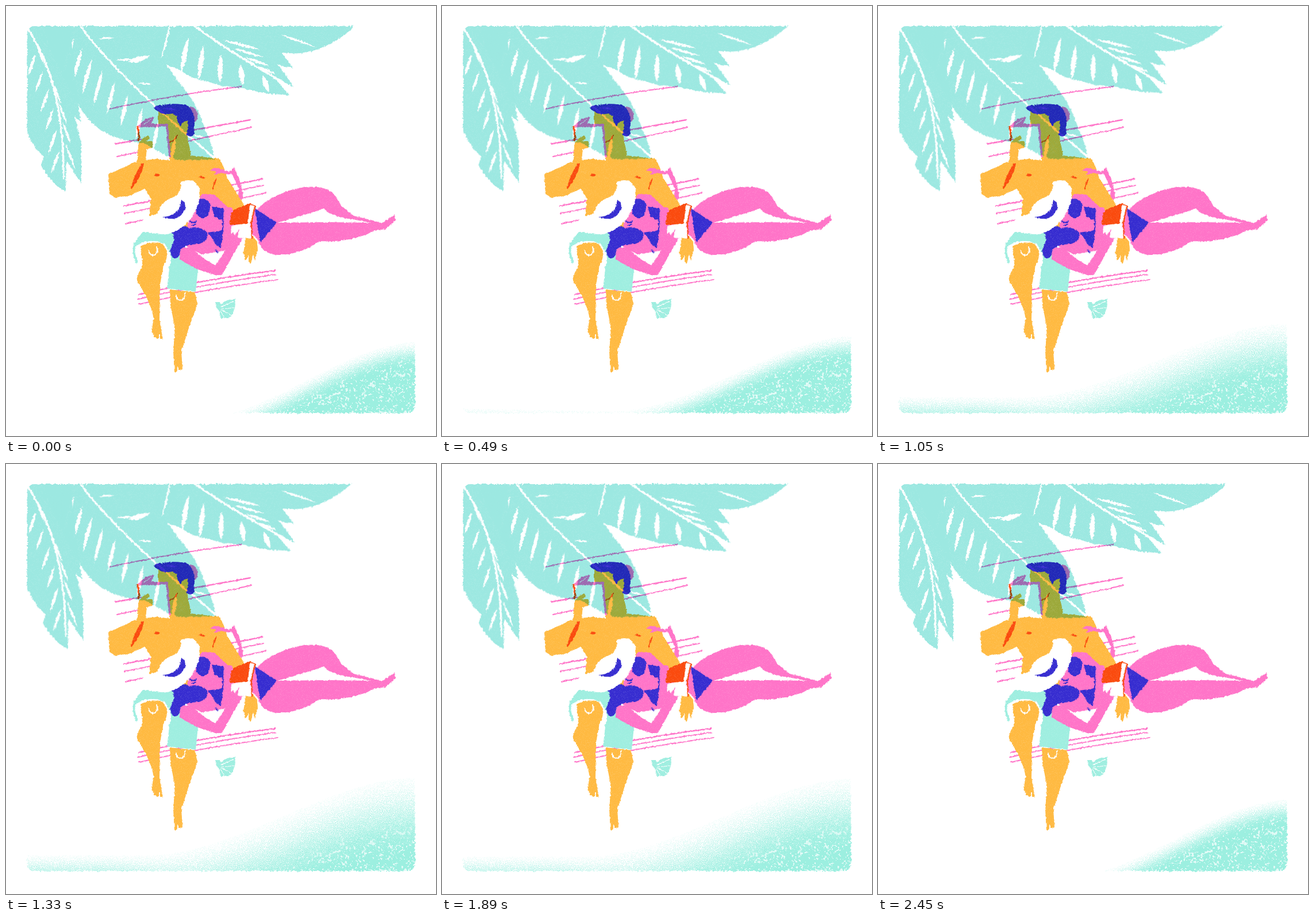
Animation of 748x748 px, one loop 2520 ms. Source, as an HTML page with a canvas:

```html
<!DOCTYPE html>
<html lang="en">
<head>
<meta charset="utf-8">
<title>Reading on the beach</title>
<style>
html, body { margin: 0; width: 100%; height: 100%; overflow: hidden; background: #fff; }
canvas { display: block; width: 748px; height: 748px; }
</style>
</head>
<body>
<canvas id="stage" width="748" height="748"></canvas>
<script>
const W = 748, LOOP = 2520, STEP = 70;
const ORANGE = '#ffba42', PINK = '#ff74c8', BLUE = '#372dd0', TEAL = '#9ce8e1',
      MINT = '#9feee0', RED = '#fa4b0f', WHITE = '#fff';
const stage = document.getElementById('stage').getContext('2d');

const clamp = v => Math.max(0, Math.min(1, v));
const ease = v => { v = clamp(v); return v * v * (3 - 2 * v); };
const mix = (a, b, k) => a + (b - a) * k;
const mixPoint = (a, b, k) => [mix(a[0], b[0], k), mix(a[1], b[1], k)];

// Seeded grain, and a slightly blurred copy for blotches and rough edges
let seed = 7;
function random() {
  seed = (seed + 0x6D2B79F5) | 0;
  let r = Math.imul(seed ^ (seed >>> 15), 1 | seed);
  r = (r + Math.imul(r ^ (r >>> 7), 61 | r)) ^ r;
  return ((r ^ (r >>> 14)) >>> 0) / 4294967296;
}
const grain = Float32Array.from({ length: W * W }, random);
const blotch = grain.map((v, i) => {
  let sum = 0;
  for (let y = -1; y < 2; y++)
    for (let x = -1; x < 2; x++) sum += grain[(i + y * W + x + W * W) % (W * W)];
  return sum / 9;
});

function layer() {
  const c = document.createElement('canvas');
  c.width = c.height = W;
  return c.getContext('2d', { willReadFrequently: true });
}

// Paints once, then frays the edges and thins the colour like chalk
function chalk(paint, fray, thin) {
  const g = layer();
  paint(g);
  const src = g.getImageData(0, 0, W, W), out = g.createImageData(W, W);
  const from = new Uint32Array(src.data.buffer), to = new Uint32Array(out.data.buffer);
  for (let i = 0; i < to.length; i++) {
    const dx = Math.round((blotch[i] - 0.5) * fray);
    const dy = Math.round((blotch[(i + 40007) % to.length] - 0.5) * fray);
    to[i] = from[i + dy * W + dx] || 0;
    if (grain[i] < 0.16) out.data[i * 4 + 3] *= 1 - thin;
  }
  g.putImageData(out, 0, 0);
  return g;
}

const fill = (g, color, d) => { g.fillStyle = color; g.fill(new Path2D(d)); };
function line(g, color, width, d) {
  g.strokeStyle = color;
  g.lineWidth = width;
  g.lineCap = 'round';
  g.stroke(new Path2D(d));
}
// Lens-shaped cut, pointed at both ends
function slit(g, [x1, y1], [x2, y2], width) {
  const k = width / Math.hypot(x2 - x1, y2 - y1);
  const nx = (y1 - y2) * k, ny = (x2 - x1) * k, mx = (x1 + x2) / 2, my = (y1 + y2) / 2;
  fill(g, WHITE, `M${x1} ${y1}Q${mx + nx} ${my + ny} ${x2} ${y2}Q${mx - nx} ${my - ny} ${x1} ${y1}Z`);
}

// Slits along the rib, their direction turning from first to last
function fan(g, [a, b, c], { count, span, first, last, width }) {
  for (let i = 0; i < count; i++) {
    const k = i / (count - 1), u = mix(span[0], span[1], k);
    const [x, y] = mixPoint(mixPoint(a, b, u), mixPoint(b, c, u), u);
    const [dx, dy] = mixPoint(first, last, k), reach = 0.95 + random() * 0.15;
    slit(g, [x + dx * 0.28, y + dy * 0.28], [x + dx * reach, y + dy * reach], width);
  }
}

function leaf({ shape, rib, fans, cuts = [] }) {
  return chalk(g => {
    fill(g, TEAL, shape);
    g.globalCompositeOperation = 'source-atop';
    line(g, WHITE, 3.5, `M${rib[0]}Q${rib[1]} ${rib[2]}`);
    fans.forEach(f => fan(g, rib, f));
    cuts.forEach(c => slit(g, ...c));
  }, 6, 0.1).canvas;
}

// Back to front: middle, left, right
const leaves = [
  { pivot: [125, 30], turn: 0.01, img: leaf({
    shape: 'M60 10H320L272 92L300 132Q334 170 346 215Q359 240 363 267L300 268L278 260L240 239Q190 234 160 212Q144 200 133 184Q100 126 74 70Z',
    rib: [[126, 30], [190, 120], [362, 264]],
    fans: [
      { count: 9, span: [0, 0.8], first: [-28, 92], last: [-10, 60], width: 7 },
      { count: 5, span: [0.15, 0.85], first: [42, -4], last: [36, 8], width: 3 }],
    cuts: [[[211, 98], [251, 87], 9]] }) },
  { pivot: [50, 35], turn: 0.014, img: leaf({
    shape: 'M20 10H110Q118 120 130 203L119 190L131 240V308L105 270L103 322Q80 312 61 276L66 262Q46 245 38 222L20 215Z',
    rib: [[38, 40], [102, 135], [100, 300]],
    fans: [
      { count: 6, span: [0.15, 0.8], first: [-16, 48], last: [-20, 56], width: 5 },
      { count: 6, span: [0.1, 0.75], first: [16, 42], last: [24, 64], width: 4 }] }) },
  { pivot: [300, 30], turn: 0.02, img: leaf({
    shape: 'M290 10H603V38Q576 62 546 74Q515 86 480 81Q492 98 499 108L472 102Q490 122 500 142L470 128L493 155Q440 152 414 143Q375 141 340 129Q318 124 304 112L268 97Z',
    rib: [[322, 30], [380, 75], [498, 142]],
    fans: [
      { count: 5, span: [0, 0.75], first: [-18, 88], last: [14, 40], width: 9 },
      { count: 5, span: [0.25, 0.8], first: [80, 20], last: [34, 20], width: 5 }],
    cuts: [[[286, 30], [266, 99], 7], [[478, 50], [540, 72], 4]] }) }
];

const frame = chalk(g => {
  g.beginPath();
  g.roundRect(37, 35, 674, 673, 13);
  g.fill();
}, 8, 0);

const figures = chalk(g => {
  // Bench
  line(g, PINK, 2, 'M181 179Q300 153 410 140');
  line(g, PINK, 2.6, 'M190 240L425 198M205 348L446 301M231 502Q330 478 468 460');
  line(g, PINK, 1.8, 'M193 262L427 211M205 361L448 312M230 510Q330 486 469 467');
  line(g, PINK, 2, 'M208 379L452 325M231 519Q330 495 472 476');

  // Man: torso, raised arm, neck and face
  fill(g, ORANGE, 'M265 184H304L318 200L315 224L322 260L372 266L381 285L385 300L413 345L394 358L350 345L320 396H250V357L252 335L242 317L216 330L190 333L180 327L178 293L228 270L231 238L244 226L251 232L246 242L243 268L284 264L283 238L265 210Z');
  fill(g, PINK, 'M314 175Q330 173 333 188Q334 200 328 202Z');
  fill(g, BLUE, 'M258 179Q258 172 268 173Q298 167 317 174Q330 186 328 204L327 224Q321 230 314 224Q318 210 316 200Q307 199 304 210L297 199Q300 191 290 187Q272 190 264 183Z');
  fill(g, ORANGE, 'M306 207Q308 198 316 203Q319 215 312 222Z');
  line(g, RED, 2, 'M284 237Q295 234 298 225');
  fill(g, RED, 'M240 272Q239 292 218 319L217 316Q227 286 236 274ZM257 294Q264 289 268 294Q263 299 257 294ZM335 297Q341 295 347 299Q341 302 335 297Z');
  line(g, RED, 2.4, 'M365 302L360 318');

  // Man: shorts and legs
  fill(g, MINT, 'M222 413L238 393L300 394L304 436L336 438L330 497L280 491L284 458L262 420L226 448Q218 430 222 413Z');
  fill(g, WHITE, 'M225 418Q250 402 276 414Q292 436 285 452L268 466L236 454Q222 438 225 418Z');
  fill(g, ORANGE, 'M234 418Q252 407 272 414Q287 428 274 452L268 484L267 545L273 580L259 577L253 566L257 545Q252 515 229 480L228 470L238 450Z');
  fill(g, ORANGE, 'M285 493L329 498L333 519L318 560L305 601L307 632L293 637L291 601L294 560L286 520Z');
  line(g, WHITE, 2, 'M248 426Q251 436 259 433Q265 428 262 420M296 504Q298 514 306 511Q313 506 311 500M267 572V580M299 628V637');

  // Woman: far arm, body, legs
  fill(g, PINK, 'M355 286L364 281L376 284L388 288L397 281L406 301L413 330L410 338L404 333L405 318L393 292L386 293L374 290L361 294L366 288Z');
  fill(g, PINK, 'M341 327L362 328L386 350L436 354Q470 322 520 315Q556 312 570 327L584 348L605 365L638 373L654 378L676 363L678 372L660 388L641 391Q600 412 545 409Q515 432 474 433Q445 432 439 408L428 396L400 410L384 425L340 432L314 418L316 372Z');
  fill(g, WHITE, 'M472 377Q520 364 553 352Q566 367 602 371L636 377L560 376Z');
  fill(g, BLUE, 'M433 352L471 377L443 411Q435 375 433 352Z');
  fill(g, BLUE, 'M358 349L379 352L377 373L362 366ZM351 394L378 390L373 421L364 414Z');
  line(g, BLUE, 2, 'M377 352Q379 390 373 420');
  line(g, BLUE, 1.5, 'M364 424L369 429');

  // Man: lowered arm
  fill(g, ORANGE, 'M385 300L413 344L427 398L437 410L438 425L433 442L430 432L426 448L422 446V434L417 443L413 430L417 404L393 352L362 319Z');

  // Woman: book, near arm
  fill(g, RED, 'M392 360L399 353L425 343L434 347L428 378L389 381Z');
  fill(g, WHITE, 'M392 382L425 377L427 404L391 403ZM424 345L432 348L426 376L421 378Z');
  line(g, RED, 2, 'M433 348L427 378L428 404');
  fill(g, PINK, 'M301 420L322 420L345 440L364 451L373 439L391 409L390 399L395 393L398 399L406 388L403 402L410 408L399 426L377 466L367 469L330 457L303 441Z');

  // Woman: hair and hat
  fill(g, BLUE, 'M331 344Q336 333 346 336Q358 341 354 356Q352 370 340 368Q331 366 330 354Z');
  fill(g, BLUE, 'M288 392Q298 376 318 386Q340 383 350 394Q354 407 336 414Q314 414 303 424Q303 440 292 439Q282 432 287 420Q296 408 288 392Z');
  line(g, BLUE, 2, 'M320 374Q326 380 331 374M324 382L330 379');
  fill(g, WHITE, 'M304 306Q326 297 336 316Q342 338 322 369Q306 391 280 397Q244 398 233 382Q230 371 264 361Q267 342 290 333Q305 327 304 306Z');
  fill(g, BLUE, 'M272 367Q302 366 305 337Q312 339 312 351Q303 378 272 367Z');

  // Man: book and fingers
  fill(g, WHITE, 'M230 209L281 205L285 269L244 263Z');
  fill(g, PINK, 'M230 208L243 196L258 193L252 205L282 205V209L232 212Z');
  line(g, WHITE, 1, 'M240 206L252 197');
  line(g, PINK, 3.5, 'M280 207Q282 235 285 262');
  line(g, RED, 3, 'M229 210Q232 222 231 234');
  fill(g, ORANGE, 'M230 240L238 230L248 225L250 230L243 235L255 235V246L245 249L243 267H231Z');

  // Shell
  fill(g, MINT, 'M364 515L372 515L374 519Q385 509 398 510Q402 529 387 543L374 543L370 529L366 526Z');
  line(g, WHITE, 1.2, 'M374 524L395 514M375 527L397 525M375 529L391 537M373 531L380 542');
}, 4.5, 0.1).canvas;

const TOP = 530, sea = layer(), water = sea.createImageData(W, W - TOP);
const bounds = frame.getImageData(0, TOP, W, W - TOP).data;

// The wave runs up the left side first and drains everywhere at once
function shoreAt(x, t) {
  const rise = ease(t / mix(950, 1500, x / W)) * ease((LOOP - t) / 750);
  const start = 320 - 75 * rise;
  return 720 - 40 * rise - 136 * ease((x - start) / (720 - start));
}

function drawSea(t) {
  const fade = 80 * ease((t - 700) / 600) * ease((LOOP - 70 - t) / 700);
  for (let x = 30; x < 716; x++) {
    const edge = shoreAt(x, t), soft = 36 + fade * mix(0.15, 1, ease((x - 150) / 350));
    for (let y = 0; y < W - TOP; y++) {
      const p = y * W + x, i = p * 4, n = p + TOP * W;
      const depth = (y + TOP - edge) / soft;
      let a = depth <= 0 ? 0 : ease(depth + (grain[n] - 0.5) * 0.6);
      if (blotch[n] > 0.6) a *= mix(0.8, 0.3, clamp(depth));
      water.data.set([156, 239, 224, a * bounds[i + 3]], i);
    }
  }
  sea.putImageData(water, 0, TOP);
  stage.drawImage(sea.canvas, 0, 0);
}

const canopy = layer();
function drawLeaves(t) {
  const sway = ease(t / 700) - ease((t - 1750) / 700);
  canopy.globalCompositeOperation = 'source-over';
  canopy.clearRect(0, 0, W, W);
  for (const { pivot: [x, y], turn, img } of leaves) {
    canopy.save();
    canopy.translate(x, y);
    canopy.rotate(-turn * sway);
    canopy.drawImage(img, -x, -y);
    canopy.restore();
  }
  canopy.globalCompositeOperation = 'destination-in';
  canopy.drawImage(frame.canvas, 0, 0);
  stage.globalCompositeOperation = 'multiply';
  stage.drawImage(canopy.canvas, 0, 0);
  stage.globalCompositeOperation = 'source-over';
}

let shown = -1;
function tick() {
  const t = Math.floor((performance.now() % LOOP) / STEP) * STEP;
  if (t !== shown) {
    shown = t;
    stage.fillStyle = WHITE;
    stage.fillRect(0, 0, W, W);
    drawSea(t);
    stage.drawImage(figures, 0, 0);
    drawLeaves(t);
  }
  requestAnimationFrame(tick);
}
tick();
</script>
</body>
</html>
```
